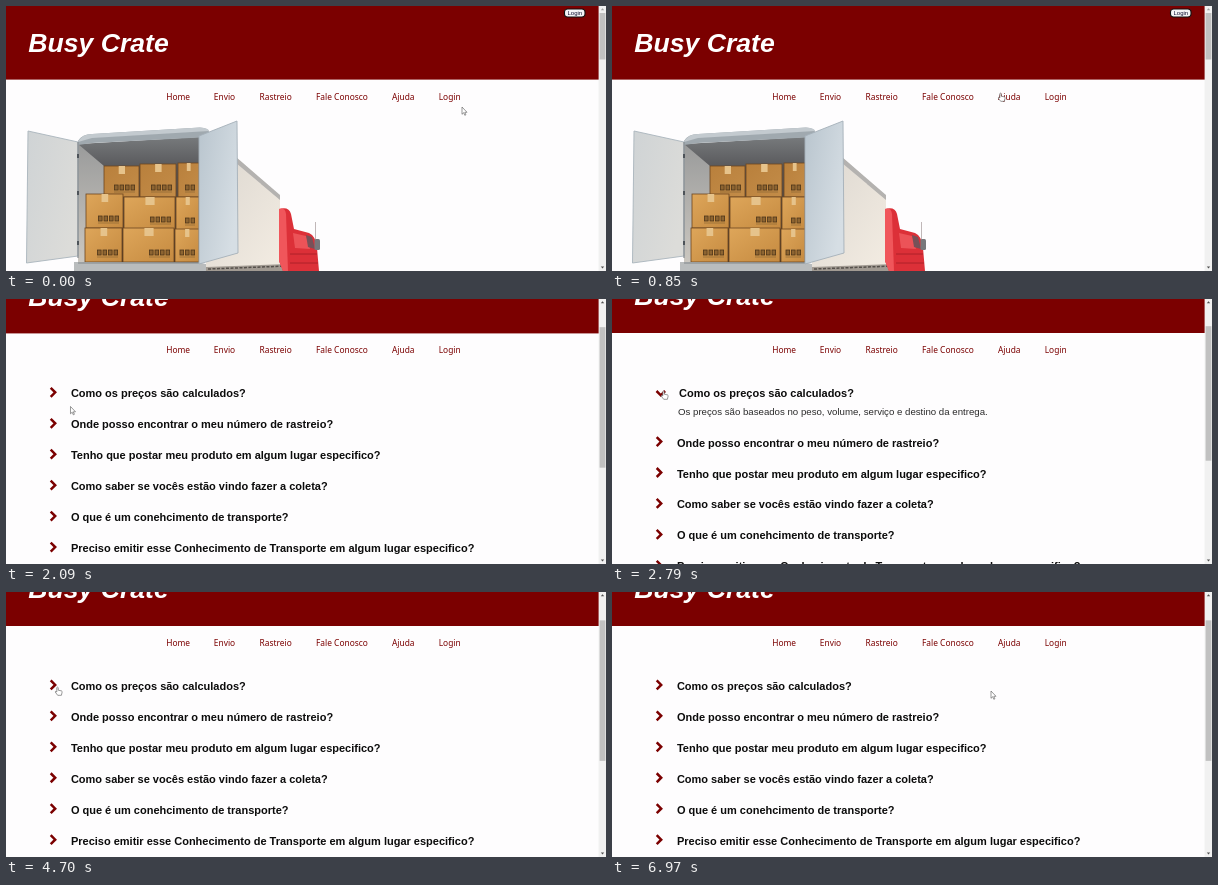
Animation of 600 by 265 pixels, one loop 7000 ms. Source, as an HTML page:

```html
<!DOCTYPE html>
<html lang="pt">
<head>
<meta charset="utf-8">
<title>Busy Crate</title>
<style>
  html, body { margin: 0; height: 100%; overflow: hidden; background: #fefdfe; }
  svg { display: block; width: 100vw; height: 100vh; }
  .brand { font: italic bold 26.6px "Liberation Sans", Arial, sans-serif; fill: #fff; }
  .nav { font: 8.4px "Noto Sans", "Open Sans", sans-serif; fill: #7b0000; }
  .question { font: bold 11px "Liberation Sans", Arial, sans-serif; fill: #0c0c0c; }
  .answer { font: 9.67px "Liberation Sans", Arial, sans-serif; fill: #2a2a2a; }
  .button { font: 6px "Liberation Sans", Arial, sans-serif; fill: #101030; }
  .chevron { fill: none; stroke: #7b0000; stroke-width: 2.5; }
</style>
</head>
<body>
<svg viewBox="0 0 600 265">
  <defs>
    <linearGradient id="leftDoor" x2="1" y2=".6">
      <stop stop-color="#cfd3d5"/><stop offset="1" stop-color="#dcdcd9"/>
    </linearGradient>
    <linearGradient id="rightDoor" x2="1" y2=".6">
      <stop stop-color="#b9c5ce"/><stop offset="1" stop-color="#d6dee4"/>
    </linearGradient>
    <linearGradient id="inside" x2="0" y2="1">
      <stop stop-color="#777a7c"/><stop offset=".25" stop-color="#57575a"/><stop offset="1" stop-color="#453424"/>
    </linearGradient>
    <linearGradient id="wall" x2="0" y2="1">
      <stop stop-color="#9a9b9b"/><stop offset="1" stop-color="#cbc7c0"/>
    </linearGradient>
    <linearGradient id="carton" x2="1" y2="1">
      <stop stop-color="#dea65a"/><stop offset="1" stop-color="#c58a40"/>
    </linearGradient>
    <linearGradient id="shadedCarton" x2="1" y2="1">
      <stop stop-color="#b9803c"/><stop offset="1" stop-color="#c38c48"/>
    </linearGradient>
    <linearGradient id="side" x2="1" y2="1">
      <stop stop-color="#dcd7d0"/><stop offset="1" stop-color="#f3ece2"/>
    </linearGradient>
  </defs>

  <g id="page">
    <rect width="593" height="73.6" fill="#7b0000"/>
    <text class="brand" x="22.300" y="46">Busy Crate</text>
    <rect x="558.5" y="3" width="20.5" height="8" rx="3.2" fill="#f4f4f6" stroke="#111" stroke-width="1.1"/>
    <text class="button" x="568.8" y="9.1" text-anchor="middle">Login</text>
    <g id="nav" class="nav"></g>

    <g id="home">
      <path d="M231 152L274 190V259L200 263V250Z" fill="url(#side)"/>
      <path d="M230 151L274 189V194L230 157Z" fill="#b4b2b0"/>
      <path d="M200 261L282 258V265H200Z" fill="#a19a92"/>
      <path d="M202 263L282 260" stroke="#55504b" stroke-width="1.5" stroke-dasharray="3 1.5"/>
      <path d="M273 203Q283 200 285 208L288 223 303 227Q310 230 311 242L313 265H277L273 255Z" fill="#dc3038"/>
      <path d="M273 203Q279 201 280 208L282 265H277L273 255Z" fill="#f0565b"/>
      <path d="M287 227L300 230 304 243 289 242Z" fill="#ec5358"/>
      <path d="M300 229L306 231 309 243 302 241Z" fill="#775158"/>
      <path d="M309.500 216V234" stroke="#b0a5a6" stroke-width=".8"/>
      <rect x="308.5" y="233" width="5.5" height="11" rx="1.5" fill="#77787b"/>
      <path d="M284 248H311M284 257H312" stroke="#ae2028"/>

      <path d="M72 138L193 131V257H72Z" fill="url(#inside)"/>
      <path d="M72 138L98 160V190H80V256H72Z" fill="url(#wall)"/>
      <path d="M72 139V135Q76 128 86 128L194 121.500Q203 122 203 126V131L86 137Z" fill="#a0a9af"/>
      <path d="M72 136Q76 128 86 128L194 121.500Q203 122 203 125L86 132Z" fill="#c3cacf"/>
      <g id="cartons"></g>
      <path d="M68 256L193 256.500 200 258V265H68Z" fill="#b9bcbd"/>
      <path d="M72 257H193" stroke="#84898c" stroke-width="1.2"/>
      <path d="M22 125L72 136V250L20.500 257Z" fill="url(#leftDoor)" stroke="#aab5bd" stroke-width=".9"/>
      <path d="M72 136V252" stroke="#858b8f" stroke-width="1.200"/>
      <path d="M72 148v4M72 185v4M72 235v4" stroke="#4d5359" stroke-width="2"/>
      <path d="M193 130L231 115 232 247 193 258Z" fill="url(#rightDoor)" stroke="#a5b0b9" stroke-width=".9"/>
    </g>

    <g id="faq">
      <text id="answer" class="answer" x="66" y="155.7">Os preços são baseados no peso, volume, serviço e destino da entrega.</text>
    </g>
  </g>

  <rect x="592.6" width="7.4" height="265" fill="#f1f1f1"/>
  <rect id="thumb" x="593.6" width="5.8" fill="#c1c1c1"/>
  <path id="up" d="M594.8 4.300L596.500 2.300 598.200 4.300Z"/>
  <path d="M594.8 260.500L596.500 262.500 598.200 260.500Z" fill="#505050"/>

  <g id="cursor" fill="#fff" stroke="#555" stroke-width=".6" stroke-linejoin="round">
    <path id="arrow" d="M0 0V7.300L1.700 5.700 2.800 8.300 3.900 7.800 2.800 5.300H5Z"/>
    <path id="hand" d="M-.7 .6Q0-.4 .7 .6V3.200L4 3.900Q4.800 4.200 4.600 5.200L3.900 8.300H.2L-2.300 5Q-2.200 4-1.300 4.500L-.7 5Z"/>
  </g>
</svg>
<script>
const $ = id => document.getElementById(id);

function add(parent, tag, attrs, text = "") {
  const el = document.createElementNS("http://www.w3.org/2000/svg", tag);
  for (const name in attrs) el.setAttribute(name, attrs[name]);
  el.textContent = text;
  return parent.appendChild(el);
}

const links = { Home: 160.2, Envio: 207.8, Rastreio: 253.6, "Fale Conosco": 310, Ajuda: 386, Login: 432.7 };
for (const label in links) add($("nav"), "text", { x: links[label], y: 93.7 }, label);

// Cartons: x, y, width, height, back row first
[
  [98, 160, 35, 31], [134, 158, 36, 33], [172, 157, 21, 34],
  [118, 191, 51, 32], [170, 191, 23, 33], [80, 188, 37, 34],
  [169, 223, 24, 33], [117, 222, 51, 34], [79, 222, 37, 34]
].forEach(([x, y, w, h], i) => {
  const box = $("cartons");
  const marks = Math.min(4, Math.floor(w / 8));
  const right = x + w - 4, bottom = y + h - 6;
  add(box, "rect", { x, y, width: w, height: h, fill: i < 3 ? "url(#shadedCarton)" : "url(#carton)", stroke: "#6b4520", "stroke-width": .8 });
  add(box, "rect", { x: x + w * .42, y, width: w * .18, height: 8, fill: "#e6c38b" });
  for (let k = 0; k < marks; k++)
    add(box, "rect", { x: right - 4 - k * 5.5, y: bottom - 6, width: 3.6, height: 5, fill: "#8d6431", stroke: "#4d3519", "stroke-width": .8 });
  add(box, "path", { d: `M${right - marks * 5.5 + 1} ${bottom + 1}H${right}`, stroke: "#80602f", "stroke-width": .6 });
});

const rows = [
  "Como os preços são calculados?",
  "Onde posso encontrar o meu número de rastreio?",
  "Tenho que postar meu produto em algum lugar especifico?",
  "Como saber se vocês estão vindo fazer a coleta?",
  "O que é um conehcimento de transporte?",
  "Preciso emitir esse Conhecimento de Transporte em algum lugar especifico?"
].map(label => {
  const group = add($("faq"), "g", {});
  return {
    group,
    chevron: add(group, "path", { class: "chevron" }),
    text: add(group, "text", { class: "question", y: 3.9 }, label)
  };
});

const LOOP = 7000, PAGE_CHANGE = 1050;
const path = [
  [0, 456, 101], [720, 388.5, 87], [1080, 388.5, 87], [1610, 219.5, 127.5],
  [1720, 205, 128], [2090, 64.5, 107.5], [2380, 51.5, 92], [3360, 51.5, 92],
  [3520, 51.5, 95], [6560, 51.5, 95], [6960, 379, 99], [LOOP, 379, 99]
];
const within = (t, a, b) => t >= a && t < b;

function cursorAt(t) {
  const i = path.findIndex(p => p[0] > t);
  const [t0, x0, y0] = path[i - 1], [t1, x1, y1] = path[i];
  const u = (t - t0) / (t1 - t0), k = u * u * (3 - 2 * u);
  return [x0 + (x1 - x0) * k, y0 + (y1 - y0) * k];
}

function show(id, visible) {
  $(id).style.display = visible ? "" : "none";
}

function render(t) {
  const home = t < PAGE_CHANGE;
  const open = within(t, 2600, 4700) || within(t, 5030, 6550);
  const u = Math.min(1, Math.max(0, (t - 1700) / 500));
  const scroll = 39.6 * (1 - (1 - u) ** 3);

  $("page").setAttribute("transform", `translate(0 ${-scroll})`);
  show("home", home);
  show("faq", !home);
  show("answer", open);

  rows.forEach(({ group, chevron, text }, i) => {
    const expanded = open && i === 0;
    const y = 133.6 + i * 30.95 + (open && i ? 18.7 : 0);
    group.setAttribute("transform", `translate(0 ${y})`);
    chevron.setAttribute("d", expanded ? "M44.500-2L48.800 2.300 53.100-2" : "M44.700-5.600L49.200-1.100 44.700 3.400");
    text.setAttribute("x", expanded ? 67.1 : 64.9);
  });

  $("thumb").setAttribute("y", 7 + scroll * (open ? .51 : .54));
  $("thumb").setAttribute("height", home ? 46.5 : open ? 134.5 : 140.5);
  $("up").setAttribute("fill", scroll ? "#505050" : "#a3a3a3");

  const hand = within(t, 640, 1120) || within(t, 2300, 6600);
  show("hand", hand);
  show("arrow", !hand);
  $("cursor").setAttribute("transform", `translate(${cursorAt(t)})`);
}

function frame() {
  render(performance.now() % LOOP);
  requestAnimationFrame(frame);
}
frame();
</script>
</body>
</html>
```
